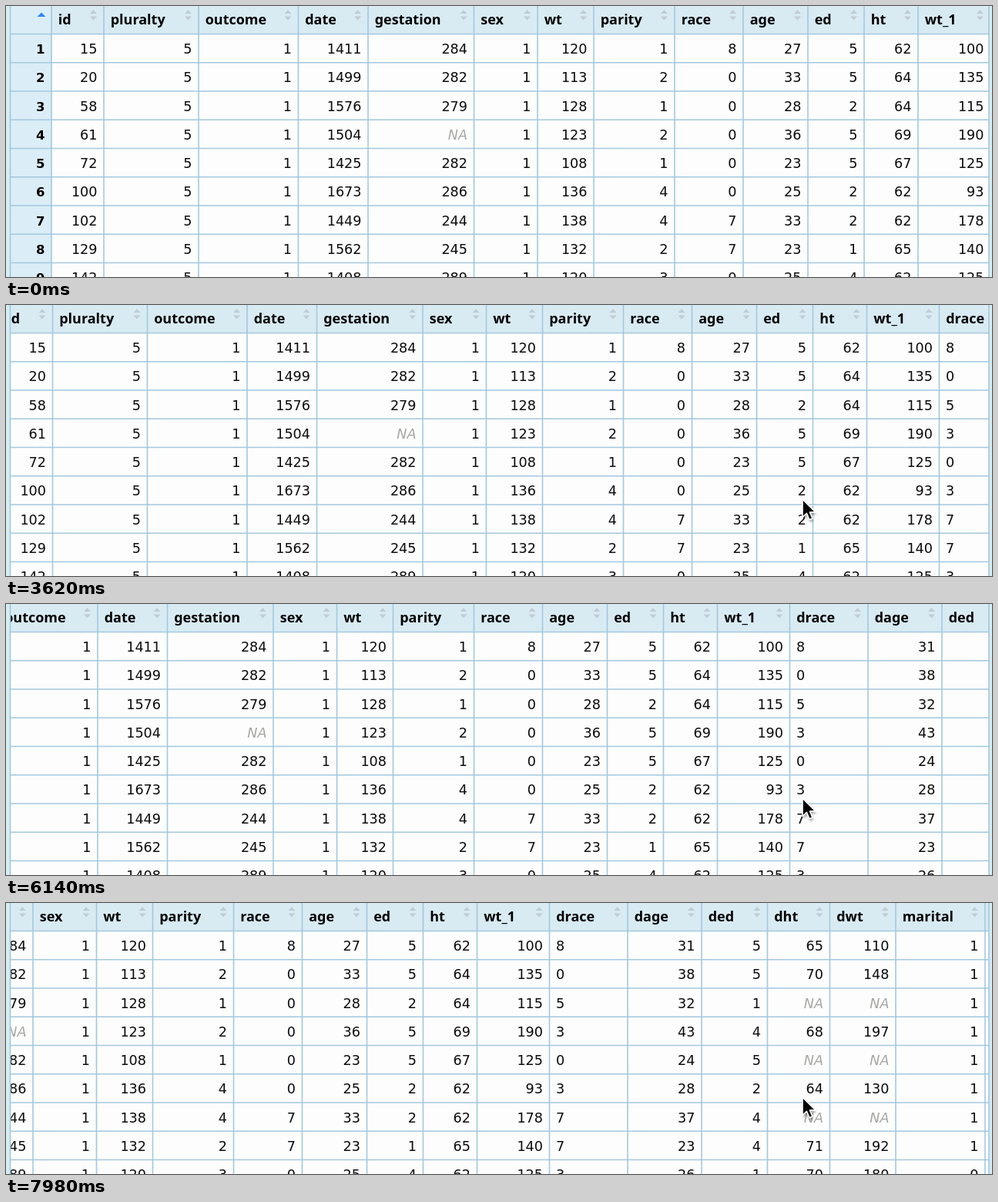
An HTML page for the animation above (8 s loop, 1280 px wide and 353 px high).

```html
<!DOCTYPE html>
<html lang="en">
<head>
<meta charset="utf-8">
<title>Scrolling data table</title>
<style>
  html, body { margin: 0; width: 100%; height: 100%; overflow: hidden; background: #d5ecf1; }
  svg { display: block; width: 1280px; height: 353px; }
  text { font: 17.6px "DejaVu Sans", sans-serif; fill: #0c0c0c; }
  .head { font: bold 18px "Noto Sans", sans-serif; fill: #000; }
  .num { font: bold 16.5px "DejaVu Sans", sans-serif; fill: #000; }
  .na { font-style: oblique; fill: #a6a6a2; }
  .end { text-anchor: end; }
  .line { stroke: #a3c8df; stroke-width: 1.6; fill: none; }
  .sort { fill: #c1ccd6; }
  .sorted { fill: #2a8aec; }
</style>
</head>
<body>
<svg viewBox="0 0 1280 353">
  <defs>
    <clipPath id="view"><rect x="6" width="1270" height="353"/></clipPath>
    <filter id="soft" x="-50%" y="-50%" width="200%" height="200%"><feGaussianBlur stdDeviation="1.6"/></filter>
    <path id="arrow" d="M0 0V23.5L5.4 18.4L9 26.8L13 25.1L9.5 16.9H17Z"/>
  </defs>
  <g clip-path="url(#view)">
    <rect x="6" width="1270" height="353" fill="#fdfdfd"/>
    <rect x="6" width="1270" height="36.5" fill="#d8ebf3"/>
    <g id="table"></g>
    <g id="rules"></g>
  </g>
  <path class="line" d="M5.5 0V353M1276 0V353"/>
  <g id="cursor">
    <use href="#arrow" x="1" y="3" fill="#000" opacity=".4" filter="url(#soft)"/>
    <use href="#arrow" fill="#000" stroke="#fff" stroke-width="1.6" stroke-linejoin="round"/>
  </g>
</svg>
<script>
const HEAD = 36.5, ROW = 37.25, LOOP = 8000;

// name, right edge, values (a single value fills the column), left-aligned
const columns = [
  ['', 59, '1 2 3 4 5 6 7 8 9'],
  ['id', 127, '15 20 58 61 72 100 102 129 142'],
  ['pluralty', 250, '5'],
  ['outcome', 379.5, '1'],
  ['date', 470, '1411 1499 1576 1504 1425 1673 1449 1562 1408'],
  ['gestation', 607.5, '284 282 279 NA 282 286 244 245 289'],
  ['sex', 690, '1'],
  ['wt', 763, '120 113 128 123 108 136 138 132 120'],
  ['parity', 868, '1 2 1 2 1 4 4 2 3'],
  ['race', 957, '8 0 0 0 0 0 7 7 0'],
  ['age', 1041, '27 33 28 36 23 25 33 23 25'],
  ['ed', 1114, '5 5 2 5 5 2 2 1 4'],
  ['ht', 1184, '62 64 64 69 67 62 62 65 62'],
  ['wt_1', 1278, '100 135 115 190 125 93 178 140 125'],
  ['drace', 1379.5, '8 0 5 3 0 3 7 7 3', true],
  ['dage', 1475.5, '31 38 32 43 24 28 37 23 26'],
  ['ded', 1561, '5 5 1 4 5 2 4 4 1'],
  ['dht', 1642, '65 70 NA 68 NA 64 NA 71 70'],
  ['dwt', 1727.5, '110 148 NA 197 NA 130 NA 192 180'],
  ['marital', 1843.5, '1 1 1 1 1 1 1 1 0']
];

const byId = id => document.getElementById(id);

function add(parent, tag, attrs, text = '') {
  const el = document.createElementNS('http://www.w3.org/2000/svg', tag);
  for (const key in attrs) el.setAttribute(key, attrs[key]);
  el.textContent = text;
  parent.appendChild(el);
}

function buildTable() {
  const table = byId('table');
  let left = 5.5;
  columns.forEach(([name, right, list, leftAligned], c) => {
    const values = list.split(' ');
    const x = right - 13.5;
    if (c === 0) {
      add(table, 'rect', { x: left, y: 0, width: right - left, height: 353, fill: '#dbedf6' });
      add(table, 'path', { class: 'sorted', d: `M${x - 5} 14h11l-5.5-5.5z` });
    } else {
      add(table, 'text', { class: 'head', x: left + 8.7, y: 24.3 }, name);
      add(table, 'path', { class: 'sort', d: `M${x - 4.5} 10h9l-4.5-5zM${x - 4.5} 13.5h9l-4.5 5z` });
    }
    for (let r = 0; r < 9; r++) {
      const value = values[r % values.length];
      const kind = c === 0 ? 'num' : value === 'NA' ? 'na' : '';
      add(table, 'text', {
        class: leftAligned ? kind : kind + ' end',
        x: leftAligned ? left + 8.5 : right - 8.5,
        y: 62 + r * ROW
      }, value);
    }
    add(table, 'path', { class: 'line', d: `M${right} 0V353` });
    left = right;
  });
  for (let r = 0; r < 9; r++) {
    add(byId('rules'), 'path', { class: 'line', d: `M6 ${HEAD + r * ROW}H1276` });
  }
}

// Smooth curve through [step, value] points that never overshoots
function curve(points) {
  const rate = i => (points[i + 1][1] - points[i][1]) / (points[i + 1][0] - points[i][0]);
  const slopes = points.map((_, i) => {
    if (i === 0 || i === points.length - 1) return 0;
    const a = rate(i - 1), b = rate(i);
    return a * b > 0 ? 2 * a * b / (a + b) : 0;
  });
  return step => {
    if (step <= points[0][0]) return points[0][1];
    const i = points.findIndex(p => p[0] >= step) - 1;
    if (i < 0) return points[points.length - 1][1];
    const [x0, y0] = points[i], [x1, y1] = points[i + 1];
    const w = x1 - x0, u = (step - x0) / w, v = 1 - u;
    return y0 * (1 + 2 * u) * v * v + slopes[i] * w * u * v * v
         + y1 * u * u * (3 - 2 * u) - slopes[i + 1] * w * u * u * v;
  };
}

const scroll = curve([[62, 0], [77, 66.5], [97, 231.5], [116, 259], [131, 260.5],
                      [145, 445], [157, 547], [169, 572.5]]);
const cursorX = curve([[22, 1092], [35, 1065], [50, 1034]]);
const cursorY = curve([[22, 362], [35, 303], [50, 253]]);

// Pictures are held for 20, 100 and 20 ms in turn
function stepAt(ms) {
  const phase = ms % 140;
  return 3 * Math.floor(ms / 140) + (phase < 20 ? 0 : phase < 120 ? 1 : 2);
}

function draw(now) {
  const step = stepAt((now - start) % LOOP);
  const shift = Math.round(scroll(step) * 2) / 2;
  byId('table').setAttribute('transform', `translate(${-shift} 0)`);
  byId('cursor').setAttribute('transform', `translate(${cursorX(step)} ${cursorY(step)})`);
  requestAnimationFrame(draw);
}

buildTable();
const start = performance.now();
draw(start);
</script>
</body>
</html>
```
